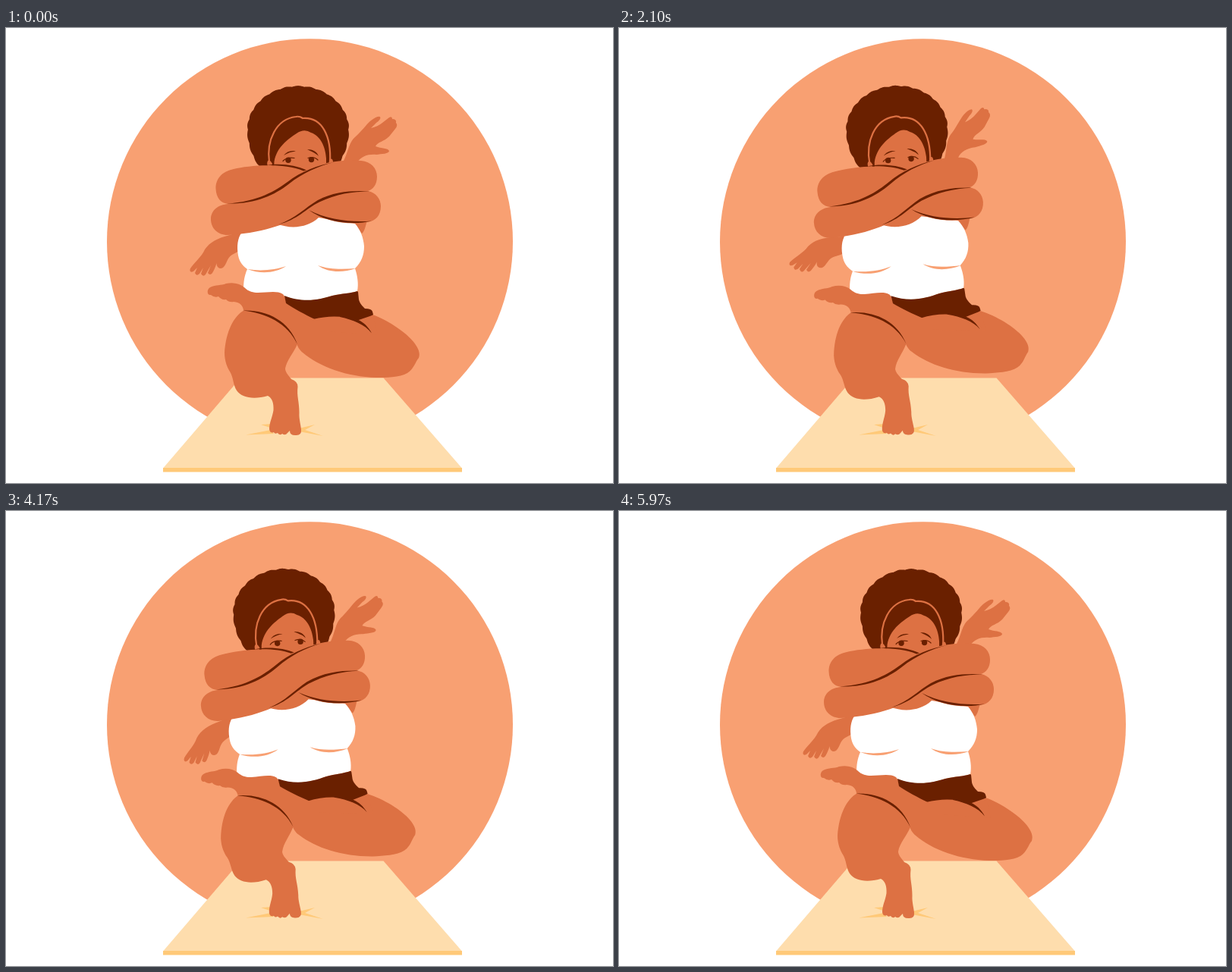
An HTML page with a canvas for the animation above (6 s loop, 800 px wide and 600 px high).

```html
<!DOCTYPE html>
<html lang="en">
<head>
<meta charset="utf-8">
<title>Yoga balance</title>
<style>
html, body { margin: 0; width: 100%; height: 100%; overflow: hidden; background: #fff; }
canvas { display: block; width: 800px; height: 600px; }
</style>
</head>
<body>
<canvas id="stage" width="800" height="600"></canvas>
<script>
const ctx = document.getElementById('stage').getContext('2d');
const LOOP = 6000;
const PEACH = '#f8a072', SKIN = '#dd7143', DARK = '#6a2000';
const MAT = '#feddad', EDGE = '#ffc978';

// Keys are [time, value]; values ease between neighbours.
const SWAY = [[0, 0], [1150, .041], [1350, .041], [2110, -.047], [2950, .041], [4150, -.047], [5320, .04], [6000, 0]];
const LEFT_HAND = [[0, 0], [1440, -.165], [2100, .25], [2760, .07], [3700, -.06], [4170, -.05], [5400, -.19], [6000, 0]];
const RIGHT_HAND = [[0, 0], [1440, .085], [2100, -.14], [2760, -.03], [4170, .015], [5400, -.045], [6000, 0]];
const GAZE = [[0, 0], [600, 0], [1200, 4], [1500, 4], [2100, -.5], [2700, 4], [3700, 4], [4170, 2.5], [5000, .5], [6000, 0]];

function valueAt(keys, t) {
  let i = 1;
  while (i < keys.length - 1 && t > keys[i][0]) i++;
  const [t0, a] = keys[i - 1], [t1, b] = keys[i];
  const p = (t - t0) / (t1 - t0);
  return a + (b - a) * (1 - Math.cos(Math.PI * p)) / 2;
}

const shape = d => new Path2D(d);

const spikes = shape('M316 536.5L349 530L353 535Z M336 523L351 522L351 528Z M386 528L407 523L394 530L418 538L386 532Z');

const leftHand = shape('M312 268L288 275C275 279 265 285 260 296C255 304 247 311 243 317C241 322 245 323 248 320L252 316L249 323Q251 328 255 324L260 316L257 324Q260 329 263 325L270 313L266 323Q269 327 272 323C276 316 278 310 278 306C276 314 280 319 286 316C291 312 291 303 298 299C303 296 308 294 312 290Z');

const rightHand = shape('M440 184C452 166 450 152 461 143C469 136 474 128 481 122Q489 116 493 117Q495 120 488 125L481 132Q490 130 496 125L505 118Q509 116 509 120Q515 120 514 125Q517 128 513 133L505 143C498 150 490 150 487 156C495 159 503 158 505 162C505 166 495 166 488 167C478 166 468 169 463 177L460 186Z');

const standingLeg = shape('M314 372C300 380 290 400 288 428C288 440 292 448 295 453C300 461 299 470 304 478C311 488 327 490 345 485C351 488 353 495 352.5 504C351 514 347 520 347 529Q348 535 353 533Q354 536 358 534Q361 538 364 535Q368 538 371 534L374 531Q374 537 381 537Q390 538 389 529C388 521 386 515 386.5 507C386.5 492 383 486 384.5 473Q384.5 466 376 463C371 457 368 453 368 449C370 438 378 430 384 417L390 395L350 365Z');

const crossedLeg = shape('M270 352C265 353 264 345 269 342C277 338 283 340 290 337C300 335 308 337 314 342C320 348 326 349 332 349C345 349 357 346 365 351Q369 355 369 363L407 383L463 377L483 378C505 386 528 402 538 415C544 423 546 429 544 435C539 441 538 449 529 455C519 461 500 461 488 461C450 460 413 447 391 428C386 424 384 419 383 416C374 388 340 372 313 372C312 366 309 362 300 361Q294 362 290 358Q284 359 280 354Q275 356 270 352Z');

const tank = shape('M311 269C305 277 304 288 306 300C308 310 313 314 318 318C314 327 313 335 313 346L330 357L368 354C390 363 412 359 430 353C443 350 454 350 463 347C465 337 463 326 460 317C468 309 472 300 472 288C471 276 467 266 460 258L412 250C398 263 376 266 357 258L335 262Z');

const tankFolds = shape('M318 318C336 321 355 319 369 314C356 323 336 325 318 318Z M411 313C427 319 445 318 461 317C444 323 425 323 411 313Z');

const shorts = shape('M367 353C392 363 414 358 430 353C443 350 454 350 463 347L464 348L465 358C466 363 470 367 473 370Q482 370 483 374L484 378L468 388C452 381 431 380 407 384C394 378 380 370 369 363Z');

const legLines = shape('M312 372.5C342 371 373 385 384 417C371 389 343 376 312 372.5Z M440 380C457 380 473 385 482 402.5C473 391 458 385 440 381Z');
const thighTop = shape('M405 384C425 379 446 379 462 386L484 378.5L490 405L420 400Z');

const armStub = shape('M455 254L476 253C474 262 472 269 469 271Z');
const chest = shape('M345 240L425 235L425 260L400 270L345 264Z');

const arms = shape('M300 186C320 181 360 178 393 187C418 177 445 173 468 175C481 176 489 185 489 196C489 206 484 213 477 215C488 217 494 226 494 235C494 247 487 255 476 256C451 260 423 256 399 241C384 252 350 268 305 272L292 273C279 273 270 264 270 252C270 241 279 233 293 232C283 231 277 224 276.5 212C276 199 285 189 300 186Z');

const armLines = shape('M291 231.5C333 229 356 214 371 203C389 189 411 181 432 177C412 182 391 191 373 205.5C353 221 328 232.5 291 231.5Z M359 259C382 251 394 237 411 227C434 215 458 214 480 215.5C456 215.5 435 219 413 229.5C395 238.5 384 253 359 259Z M399 240C424 253 455 256.5 482 254.5C455 260.5 421 256 399 240Z M344 181C361 178 383 181 396 187.5L392 188.5C379 183 363 181 344 181Z');

const face = shape('M353 188L353.5 176C357 157 371 147 383 139Q393 132 402 138C414 142 421 156 422 172L422 188Z');
const ears = shape('M349 186Q342 181 345 175Q348 173 351 179Z M425 186L426 174Q430 170 431 176L430 184Z');
const band = shape('M347 177C343 148 356 120 382 117Q387 116 391 119C417 117 429 143 427 178');
const brows = shape('M366 168C370 163 375 161 382 162.5C376 163 371 165 366 168Z M397 160C404 160 410 163 412 169C407 164 402 163 397 160Z');
const lids = shape('M365 175.5Q370 170 380 171.5 M398 171.5Q406 169 411 174');

const hair = (() => {
  const p = new Path2D(), steps = 360;
  for (let i = 0; i < steps; i++) {
    const a = i / steps * 2 * Math.PI;
    const bump = 1.2 * Math.abs(Math.sin(a * 13)) - .6;
    const x = 385 + (66.7 + bump) * Math.cos(a);
    const y = 134 + ((a < Math.PI ? 75 : 57.3) + bump) * Math.sin(a);
    p.lineTo(x, y);
  }
  p.closePath();
  return p;
})();

function fill(path, color) {
  ctx.fillStyle = color;
  ctx.fill(path);
}

function stroke(path, color, width) {
  ctx.strokeStyle = color;
  ctx.lineWidth = width;
  ctx.lineCap = 'round';
  ctx.stroke(path);
}

function disc(x, y, r, color) {
  ctx.fillStyle = color;
  ctx.beginPath();
  ctx.arc(x, y, r, 0, 2 * Math.PI);
  ctx.fill();
}

function turned(x, y, angle, paint) {
  ctx.save();
  ctx.translate(x, y);
  ctx.rotate(angle);
  ctx.translate(-x, -y);
  paint();
  ctx.restore();
}

const matTop = shape('M309 461.5L497.5 461.5L601 580.5L207 580.5Z');
const matEdge = shape('M207 580L601 580L601 585.5L207 585.5Z');

function drawScene() {
  ctx.fillStyle = '#fff';
  ctx.fillRect(0, 0, 800, 600);
  disc(400.5, 281.8, 267.5, PEACH);
  fill(matTop, MAT);
  fill(matEdge, EDGE);
  fill(spikes, EDGE);
}

function drawHead(gaze) {
  fill(hair, DARK);
  fill(ears, SKIN);
  stroke(band, SKIN, 2.2);
  fill(face, SKIN);
  fill(brows, DARK);
  stroke(lids, DARK, 1.2);
  disc(372 + gaze, 174.3, 3.7, DARK);
  disc(402.5 + gaze, 173.6, 3.7, DARK);
}

function drawBody(t) {
  turned(300, 283, valueAt(LEFT_HAND, t), () => fill(leftHand, SKIN));
  turned(455, 172, valueAt(RIGHT_HAND, t), () => fill(rightHand, SKIN));
  fill(standingLeg, SKIN);
  fill(armStub, SKIN);
  fill(chest, SKIN);
  fill(tank, '#fff');
  fill(tankFolds, PEACH);
  fill(crossedLeg, SKIN);
  fill(shorts, DARK);
  fill(thighTop, SKIN);
  fill(legLines, DARK);
  drawHead(valueAt(GAZE, t));
  fill(arms, SKIN);
  fill(armLines, DARK);
}

function frame(now) {
  const t = now % LOOP;
  drawScene();
  turned(369, 533, valueAt(SWAY, t), () => drawBody(t));
  requestAnimationFrame(frame);
}

requestAnimationFrame(frame);
</script>
</body>
</html>
```
